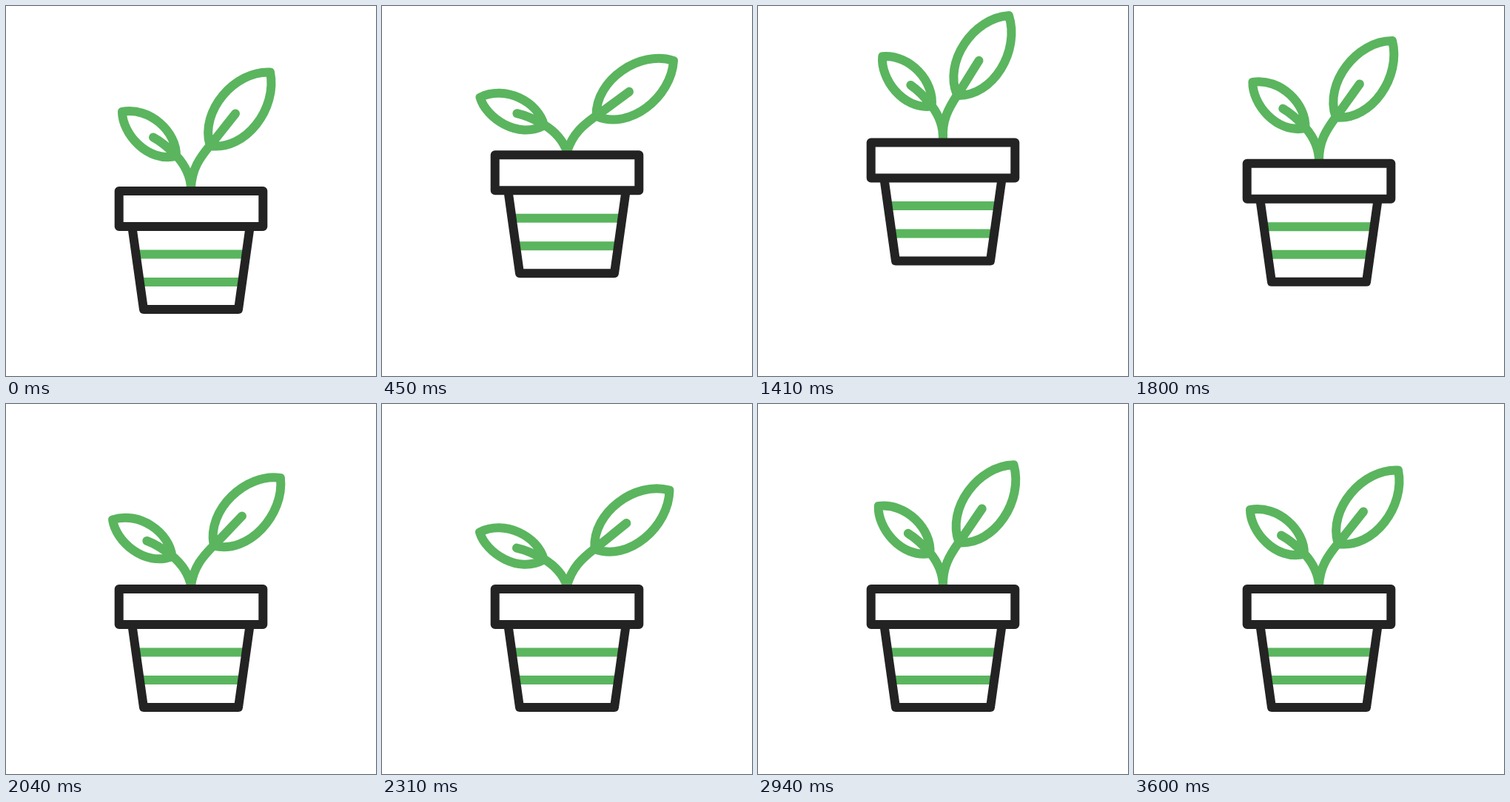
An HTML page with a canvas that plays this animation: 500 by 500 pixels, repeating every 5.63 s.

```html
<!DOCTYPE html>
<html lang="en">
<head>
<meta charset="utf-8">
<title>Potted plant</title>
<style>
html, body { margin: 0; width: 100%; height: 100%; overflow: hidden; background: #fff; }
canvas { display: block; width: 100vmin; height: 100vmin; }
</style>
</head>
<body>
<canvas width="500" height="500"></canvas>
<script>
const ctx = document.querySelector('canvas').getContext('2d');
const LOOP = 5630, STEP = 30, END = 3600;
const GREEN = '#5ab55e', BLACK = '#232323';
const BASE = { x: 250, y: 245.5 };

const stripes = new Path2D('M176 335.5H324M181 373H319');
const pot = new Path2D('M152.7 250H347.3V298H152.7ZM170.3 298L186 410H314L329.7 298');
const rightLeaf = new Path2D(
  'M357 89.5C309 87 262 142 275.5 188L276 189C324 196 367 138 357 89.5Z' +
  'M310 145.5C292 168 283 180 276 188C262 205 251 220 250 246');
const leftLeaf = new Path2D(
  'M157 143C194 136 231 170 230 203C191 212 157 172 157 143Z' +
  'M199 177.5C213 185 222 194 230 202C241 214 249 228 250 246');

// [time, degrees the leaf opens outwards]
const rightSway = [[0, 0], [420, 15.2], [1290, -6.4], [1580, -6.4], [2395, 13.2], [3100, -6.7], [3600, 0]];
const leftSway = [[0, 0], [430, 15.9], [1290, -6], [1580, -6], [2395, 17], [3100, -6.2], [3600, 0]];

const smooth = u => u * u * (3 - 2 * u);

function sway(keys, t) {
  for (let i = 1; i < keys.length; i++) {
    const [t0, a] = keys[i - 1], [t1, b] = keys[i];
    if (t < t1) return a + (b - a) * smooth((t - t0) / (t1 - t0));
  }
  return 0;
}

function jump(t) {
  if (t < 1000) return 70 * (1 - (1 - t / 1000) ** 2);
  return 70 * Math.max(0, 1 - ((t - 1000) / 1030) ** 3);
}

function stroke(path, color) {
  ctx.strokeStyle = color;
  ctx.stroke(path);
}

function drawLeaf(path, degrees) {
  ctx.save();
  ctx.translate(BASE.x, BASE.y);
  ctx.rotate(degrees * Math.PI / 180);
  ctx.translate(-BASE.x, -BASE.y);
  stroke(path, GREEN);
  ctx.restore();
}

function draw(t) {
  ctx.fillStyle = '#fff';
  ctx.fillRect(0, 0, 500, 500);
  ctx.save();
  ctx.translate(0, -jump(t));
  ctx.lineWidth = 12;
  ctx.lineJoin = 'round';
  ctx.lineCap = 'round';
  drawLeaf(leftLeaf, -sway(leftSway, t));
  drawLeaf(rightLeaf, sway(rightSway, t));
  ctx.lineCap = 'butt';
  stroke(stripes, GREEN);
  stroke(pot, BLACK);
  ctx.restore();
}

const start = performance.now();
function tick() {
  const t = (performance.now() - start) % LOOP;
  draw(Math.min(END, Math.floor(t / STEP) * STEP));
  requestAnimationFrame(tick);
}
tick();
</script>
</body>
</html>
```
